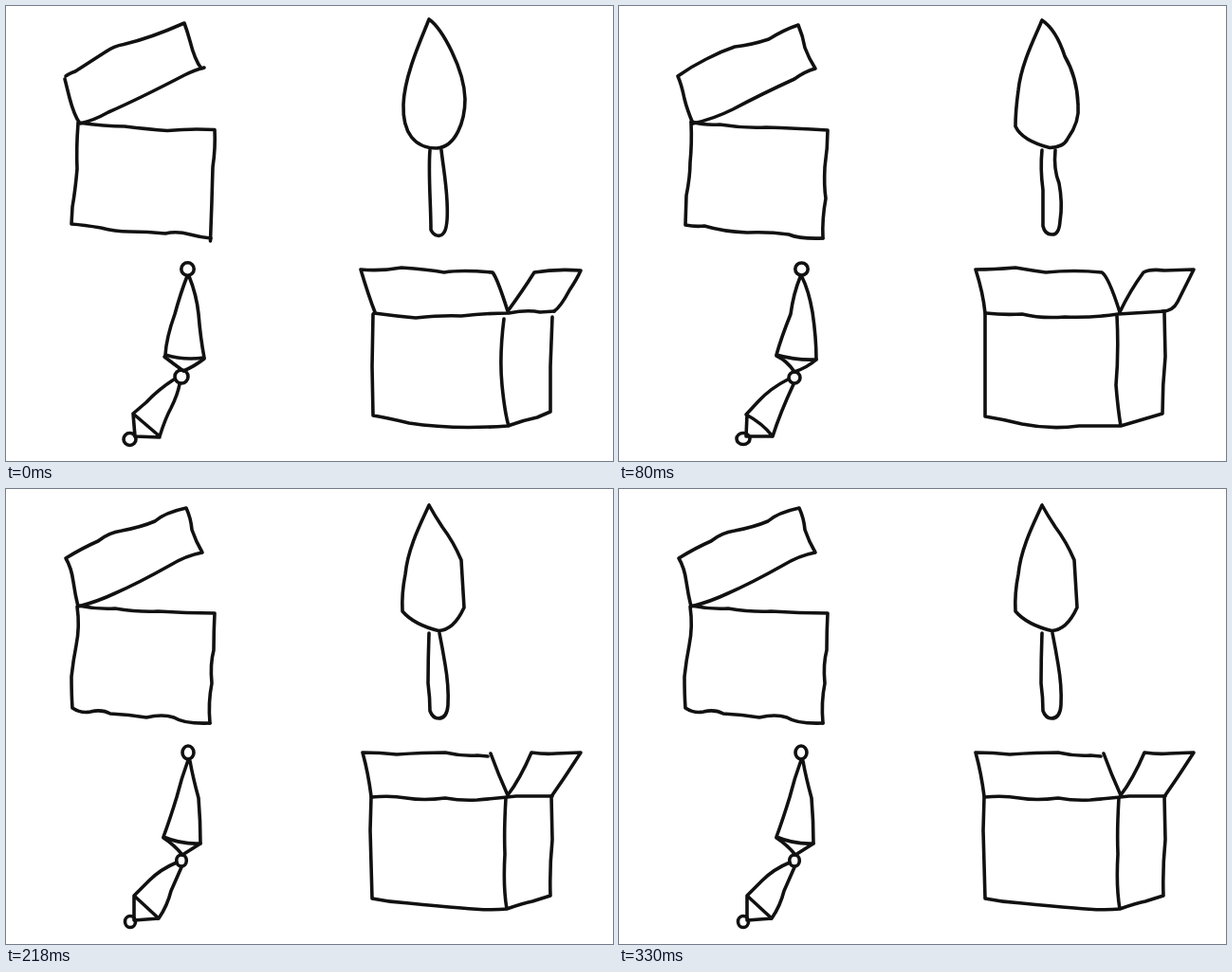
These frames come from a looping animation (640 by 480 pixels, 0.41 s). An HTML page:

```html
<!DOCTYPE html>
<html lang="en">
<head>
<meta charset="utf-8">
<title>Boiling line doodles</title>
<style>
html, body { margin: 0; width: 100%; height: 100%; overflow: hidden; background: #fff; }
svg { display: block; width: 640px; height: 480px; }
g { fill: none; stroke: #111; stroke-width: 3.6; stroke-linecap: round; stroke-linejoin: round; }
.pose { visibility: hidden; animation: 410ms step-end infinite; }
/* Pose order: 1 2 3 2 3, held for 80, 90, 80, 80, 80 ms */
.p1 { animation-name: first; }
.p2 { animation-name: second; }
.p3 { animation-name: third; }
@keyframes first {
  0% { visibility: visible; }
  19.512%, 100% { visibility: hidden; }
}
@keyframes second {
  0%, 41.463%, 80.488%, 100% { visibility: hidden; }
  19.512%, 60.976% { visibility: visible; }
}
@keyframes third {
  0%, 60.976% { visibility: hidden; }
  41.463%, 80.488%, 100% { visibility: visible; }
}
</style>
</head>
<body>
<svg viewBox="0 0 640 480">
  <g class="pose p1">
    <!-- lidded box -->
    <path d="M63 74Q65 72 73 69L104 49Q114 42 124 40.500Q152 34 188 18Q191 26 194 37Q199 57 206 66L209 65Q200 67 188 73Q140 98 108 112Q92 121 78 124Q72 116 67 97Q64 85 62 77"/>
    <path d="M76 123Q105 127 125 127Q150 130 170 131.500Q195 129 220 130.500Q221 150 218 170Q217 210 215.500 248"/>
    <path d="M76 124Q74 150 75 172Q73 195 70 212L69 230Q82 231 100 234Q115 238 130 238Q150 238 168 240Q180 237 194 241Q205 244 216 245"/>
    <!-- trowel -->
    <path d="M446 14C440 30 420 72 419 104C418 134 431 150 454 150C474 149 484 122 484 98C483 66 460 24 446 14"/>
    <path d="M447 152C445 175 448 210 448 236C451 243 458 244 461 240C465 236 466 225 465 206C464 185 461 170 459 152"/>
    <!-- hanging ornament -->
    <circle cx="191.500" cy="277.500" r="6.700"/>
    <path d="M191 285Q184 303 178 325Q169 350 168 368Q187 374 209 371Q205 350 203 325Q201 305 193 285"/>
    <path d="M167 370Q176 377 187 385Q199 380 209 372"/>
    <circle cx="185" cy="391" r="7"/>
    <path d="M177 394Q160 405 148 418L134 430L162 454Q168 435 174 424Q181 410 183 399M134 430L136 454L162 455"/>
    <circle cx="130.500" cy="457" r="6.500"/>
    <!-- open carton -->
    <path d="M389 323Q382 305 374 278Q395 280 417 276Q445 278 462 281Q480 278 513 281Q518 287 529 322Q545 300 557 281Q580 277 606 279Q602 288 594 300Q585 317 578 322"/>
    <path d="M388 324Q410 327 432 329Q460 326 480 327Q505 324 530 324Q550 320 563 323L578 322"/>
    <path d="M387 325L386 380L387 432Q400 434 425 440Q470 447 529 443Q545 437 560 434L574 428L574 380L576 328M525 330Q520 370 523 400Q526 430 530 443"/>
  </g>

  <g class="pose p2">
    <path d="M62 74Q76 64 92 56Q107 48 122 43Q140 41 158 35Q174 25 189 20Q194 32 196 44Q200 55 207 66Q196 69 185 77Q150 93 120 109Q100 119 78 124Q72 110 69 98Q66 83 62 74"/>
    <path d="M76 122Q90 126 106 125Q130 129 155 128Q185 129 220 131Q220 150 217 170Q216 190 218 203Q214 225 215 245"/>
    <path d="M76 123Q77 145 75 165Q75 180 71 200L70 231Q80 233 90 232Q110 238 135 239Q158 238 179 241Q191 246 215 245"/>
    <path d="M446 15C440 30 424 60 421 89Q418 111 418 127Q425 142 454 149.500Q469 149 473 140Q486 122 484 104Q483 75 470 53Q461 25 446 15"/>
    <path d="M446 152Q444 172 447 194L447 232Q449 241 456 241Q464 242 465 227Q468 208 464 187Q458 172 460 152"/>
    <ellipse cx="192.500" cy="277.500" rx="6.700" ry="6.500"/>
    <path d="M191 286Q184 303 181 325Q171 350 166 368Q187 374 208 373Q208 350 204 323Q200 300 193 286"/>
    <path d="M166 369Q177 374 185 386Q199 381 208 373"/>
    <circle cx="185" cy="392" r="6"/>
    <path d="M178 394Q160 403 147 417L134 431Q151 440 162 454Q170 429 184 399M135 431L134 454L162 454"/>
    <ellipse cx="131" cy="456.500" rx="7" ry="6"/>
    <path d="M386 324Q384 303 376 278Q395 278 418 276Q435 279 450 281Q480 278 509 281Q516 285 528 323Q539 300 553 281Q560 277 575 279L606 278Q598 294 589 312Q584 322 573 322"/>
    <path d="M387 324Q405 326 425 325Q445 330 470 328Q500 329 526 325L576 322"/>
    <path d="M386 325L386 433Q405 436 425 441Q455 447 485 443L529 443L573 430Q573 400 576 370L575 324M525 327Q527 365 524 400Q526 425 529 443"/>
  </g>

  <g class="pose p3">
    <path d="M63 73Q81 62 97 55Q108 46 122 44Q143 40 157 34Q167 25 190 20Q195 31 196 43Q200 55 207 67Q190 70 172 81Q140 99 115 110Q96 119 76 124Q73 112 71 98Q69 83 63 73"/>
    <path d="M76 123Q95 127 115 126Q140 130 160 129Q190 131 220 131Q219 150 219 170Q215 185 217 205Q213 225 215 247"/>
    <path d="M75 124Q78 145 74 165Q71 180 69 198Q69 217 70 231Q79 237 89 235Q101 232 110 237Q130 238 148 241Q165 237 177 241Q188 248 215 247"/>
    <path d="M446 17C440 31 424 60 421 90Q417 110 418 129Q430 143 456 149.500Q472 149 483 125Q482 107 480 75Q472 56 460 40Q452 28 446 17"/>
    <path d="M446 152Q445 180 445 205Q447 220 447 234Q450 242 456 242Q465 242 466 228Q467 208 463 185Q460 167 457 152"/>
    <ellipse cx="192" cy="278" rx="6" ry="7"/>
    <path d="M192 286Q185 305 180 325Q173 348 166 367Q185 375 205 374Q205 350 203 326Q197 304 194 287"/>
    <path d="M166 368Q177 375 186 386L205 374"/>
    <ellipse cx="185" cy="392" rx="5.300" ry="6"/>
    <path d="M180 394Q163 401 151 413L135 429L161 453Q170 440 174 424L185 399M135 429L135 455L161 453"/>
    <ellipse cx="131" cy="456.500" rx="5.500" ry="6"/>
    <path d="M385 324Q382 300 376 278Q395 278 412 280Q440 278 463 278Q480 282 497 281L508 282M511 279Q519 301 529 323Q542 306 554 278Q568 280 580 279L606 278Q595 295 589 304L576 323"/>
    <path d="M386 325Q405 323 422 326Q440 329 463 326Q480 329 497 328Q520 326 538 324L576 324"/>
    <path d="M385 325L384 360L386 432Q405 436 425 437Q455 440 480 442Q510 445 528 443Q545 437 555 435L574 429Q573 400 576 370L575 324M527 326Q525 360 526 385Q524 420 528 443"/>
  </g>
</svg>
</body>
</html>
```
